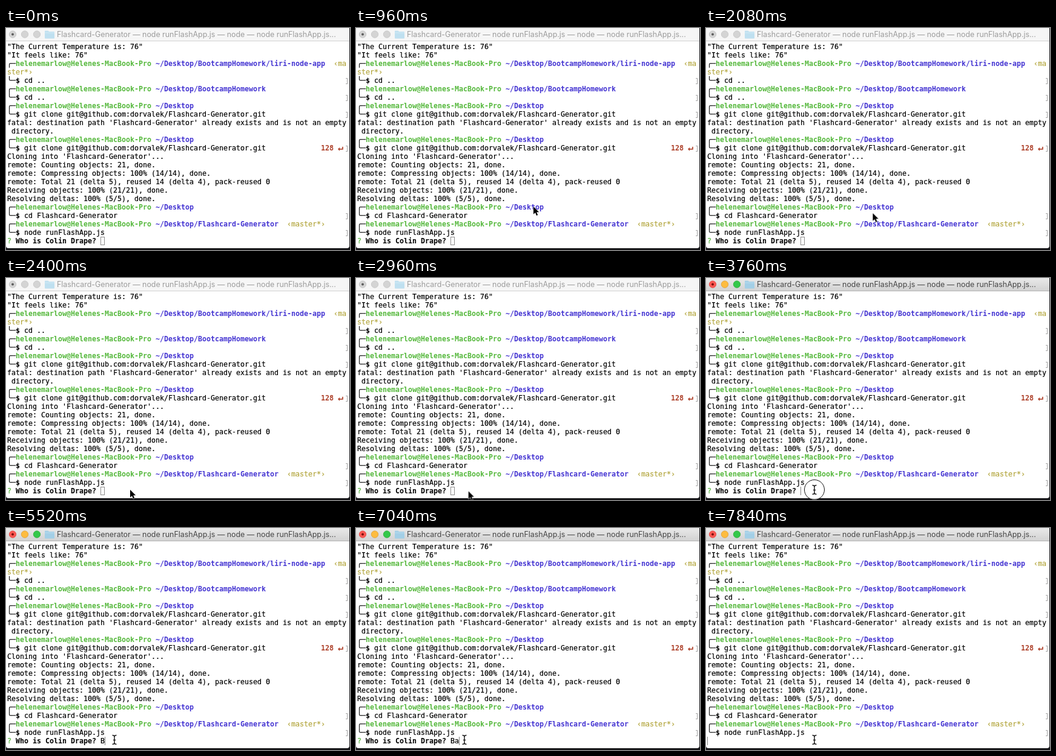
These frames come from a looping animation (568x368 px, 8000 ms). An HTML page:

```html
<!DOCTYPE html>
<html lang="en">
<head>
<meta charset="utf-8">
<title>Terminal flashcards</title>
<style>
html, body { margin: 0; width: 100%; height: 100%; overflow: hidden; background: #17171a; }
.window {
  position: absolute; left: 0; top: 0; width: 567px; height: 365px;
  background: #fff; border-radius: 0 0 4px 4px; overflow: hidden;
}

/* title bar */
.bar {
  position: absolute; left: 0; top: 0; width: 100%; height: 21px;
  background: #f6f6f6; border-bottom: 1px solid #d0d0d0;
}
.bar svg { position: absolute; left: 0; top: 0; }
.title {
  position: absolute; left: 84px; top: 0; white-space: pre;
  font: 12.4px/21px Inter, Roboto, sans-serif; color: #9c9c9c;
}
.focused { background: linear-gradient(#e9e9e9, #d2d2d2); border-color: #b2b2b2; }
.focused .title { color: #464646; }

/* terminal text */
pre, .row {
  margin: 0; position: absolute; left: 2px; white-space: pre; color: #000;
  font: 11.63px/14px "DejaVu Sans Mono", "Liberation Mono", monospace;
  -webkit-text-stroke: .2px;
}
pre { top: 24px; }
.row { top: 346px; height: 14px; }
b { font-weight: 700; -webkit-text-stroke: 0; }
.u { color: #55b83c; }
.p { color: #4535d2; }
.g { color: #b3a63e; }
.r { color: #ad3f28; }
.enter { font-size: 15px; line-height: 0; }
.mark {
  position: absolute; left: 561px; width: 2px; height: 8px;
  border: 1px solid #a8a8a8; border-left: 0;
}

/* caret and typed answer */
.block {
  position: absolute; left: 156px; top: 346px; width: 5px; height: 12px;
  border: 1px solid #8c8c8c;
}
.prompt { position: absolute; left: 0; top: 0; }
.typed {
  position: absolute; left: 154px; top: 0; width: 0; height: 14px;
  overflow: hidden; border-right: 1px solid #808080;
}

/* pointer */
.pointer, .beam, .ring { position: absolute; left: 0; top: 0; overflow: visible; }

.focused, .block, .typed, .prompt, .beam, .ring { animation: 8s step-end infinite; }
.focused { animation-name: focus; }
.block { animation-name: blur; }
.typed { animation-name: type; }
.prompt { animation-name: clear; }
.beam { animation-name: beam; }
.ring { animation-name: ring; }
.pointer { animation: move 8s linear infinite; }

@keyframes focus { 0% { visibility: hidden; } 47%, 100% { visibility: visible; } }
@keyframes blur { 0% { visibility: visible; } 47%, 100% { visibility: hidden; } }
@keyframes beam { 0% { visibility: hidden; } 46%, 100% { visibility: visible; } }
@keyframes ring {
  0% { visibility: hidden; } 46% { visibility: visible; } 48%, 100% { visibility: hidden; }
}
@keyframes clear { 0% { visibility: visible; } 98%, 100% { visibility: hidden; } }
@keyframes type {
  0% { width: 0; visibility: hidden; left: 154px; }
  47% { width: 0; visibility: visible; left: 154px; }
  69% { width: 7px; left: 154px; }
  77% { width: 0; left: 154px; }
  85% { width: 7px; left: 154px; }
  88% { width: 14px; left: 154px; }
  90% { width: 21px; left: 154px; }
  97% { width: 42px; left: 154px; }
  98%, 100% { width: 0; left: 0; visibility: visible; }
}
@keyframes move {
  0% { transform: translate(258px, 346px); visibility: hidden; animation-timing-function: step-end; }
  9% { transform: translate(258px, 346px); visibility: visible; animation-timing-function: steps(3); }
  12% { transform: translate(293px, 296px); animation-timing-function: step-end; }
  25% { transform: translate(293px, 296px); animation-timing-function: steps(5); }
  30% { transform: translate(205px, 351px); animation-timing-function: steps(6); }
  36% { transform: translate(187px, 354px); animation-timing-function: steps(6); }
  42% { transform: translate(179px, 351px); visibility: visible; animation-timing-function: step-end; }
  46%, 100% { transform: translate(179px, 351px); visibility: hidden; animation-timing-function: step-end; }
}
</style>
</head>
<body>
<div class="window">
  <div class="bar">
    <svg width="84" height="21">
      <g fill="#d4d4d4" stroke="#c2c2c2" stroke-width=".8">
        <circle cx="11" cy="10.5" r="5.7"/><circle cx="31" cy="10.5" r="5.7"/><circle cx="51" cy="10.5" r="5.7"/>
      </g>
      <circle cx="11" cy="10.5" r="2" fill="#5c5c5c"/>
      <path d="M64 5.5q0-1 1-1h4.5l1.5 1.5h8q1 0 1 1v9.5q0 1-1 1h-14q-1 0-1-1z" fill="#bfe0f0"/>
      <path d="M64 8h16" stroke="#d5ecf6"/>
    </svg>
    <div class="title">Flashcard-Generator — node runFlashApp.js — node — node runFlashApp.js...</div>
  </div>
  <div class="bar focused">
    <svg width="84" height="21">
      <g stroke-width=".8">
        <circle cx="11" cy="10.5" r="5.7" fill="#fc5753" stroke="#df4744"/>
        <circle cx="31" cy="10.5" r="5.7" fill="#fdbc40" stroke="#de9f34"/>
        <circle cx="51" cy="10.5" r="5.7" fill="#34c84a" stroke="#27aa35"/>
      </g>
      <circle cx="11" cy="10.5" r="2" fill="#7a0f0c"/>
      <path d="M64 5.5q0-1 1-1h4.5l1.5 1.5h8q1 0 1 1v9.5q0 1-1 1h-14q-1 0-1-1z" fill="#a3cfe6"/>
      <path d="M64 8h16" stroke="#bcdeee"/>
    </svg>
    <div class="title">Flashcard-Generator — node runFlashApp.js — node — node runFlashApp.js...</div>
  </div>

  <pre>"The Current Temperature is: 76"
"It feels like: 76"
╭─<b class="u">helenemarlow@Helenes-MacBook-Pro</b> <b class="p">~/Desktop/BootcampHomework/liri-node-app</b>  <span class="g">‹ma
ster*›</span>
╰─<b>$</b> cd ..
╭─<b class="u">helenemarlow@Helenes-MacBook-Pro</b> <b class="p">~/Desktop/BootcampHomework</b>
╰─<b>$</b> cd ..
╭─<b class="u">helenemarlow@Helenes-MacBook-Pro</b> <b class="p">~/Desktop</b>
╰─<b>$</b> git clone git@github.com:dorvalek/Flashcard-Generator.git
fatal: destination path 'Flashcard-Generator' already exists and is not an empty
 directory.
╭─<b class="u">helenemarlow@Helenes-MacBook-Pro</b> <b class="p">~/Desktop</b>
╰─<b>$</b> git clone git@github.com:dorvalek/Flashcard-Generator.git             <b class="r">128 <span class="enter">↵</span></b>
Cloning into 'Flashcard-Generator'...
remote: Counting objects: 21, done.
remote: Compressing objects: 100% (14/14), done.
remote: Total 21 (delta 5), reused 14 (delta 4), pack-reused 0
Receiving objects: 100% (21/21), done.
Resolving deltas: 100% (5/5), done.
╭─<b class="u">helenemarlow@Helenes-MacBook-Pro</b> <b class="p">~/Desktop</b>
╰─<b>$</b> cd Flashcard-Generator
╭─<b class="u">helenemarlow@Helenes-MacBook-Pro</b> <b class="p">~/Desktop/Flashcard-Generator</b>  <span class="g">‹master*›</span>
╰─<b>$</b> node runFlashApp.js</pre>

  <div class="mark" style="top:83px"></div>
  <div class="mark" style="top:111px"></div>
  <div class="mark" style="top:139px"></div>
  <div class="mark" style="top:195px"></div>
  <div class="mark" style="top:307px"></div>
  <div class="mark" style="top:335px"></div>

  <div class="block"></div>
  <div class="row"><span class="prompt"><span class="u">?</span> <b>Who is Colin Drape?</b></span><span class="typed">Bardon</span></div>
</div>

<svg class="ring" width="568" height="368">
  <circle cx="179" cy="351" r="16.5" fill="#fff" fill-opacity=".8" stroke="#111"/>
</svg>
<svg class="beam" width="568" height="368">
  <path d="M175.5 343.5q3.5 0 3.5 2.5q0-2.5 3.5-2.5M179 346v10M175.5 358.5q3.5 0 3.5-2.5q0 2.5 3.5 2.5M177 351.5h4" fill="none" stroke="#222" stroke-width="1.5"/>
</svg>
<svg class="pointer" width="12" height="18">
  <path d="M0 0v12.8l3-2.8 2 4.9 2.200-.9-2-4.700h4z" fill="#000" stroke="#fff" paint-order="stroke"/>
</svg>
</body>
</html>
```
